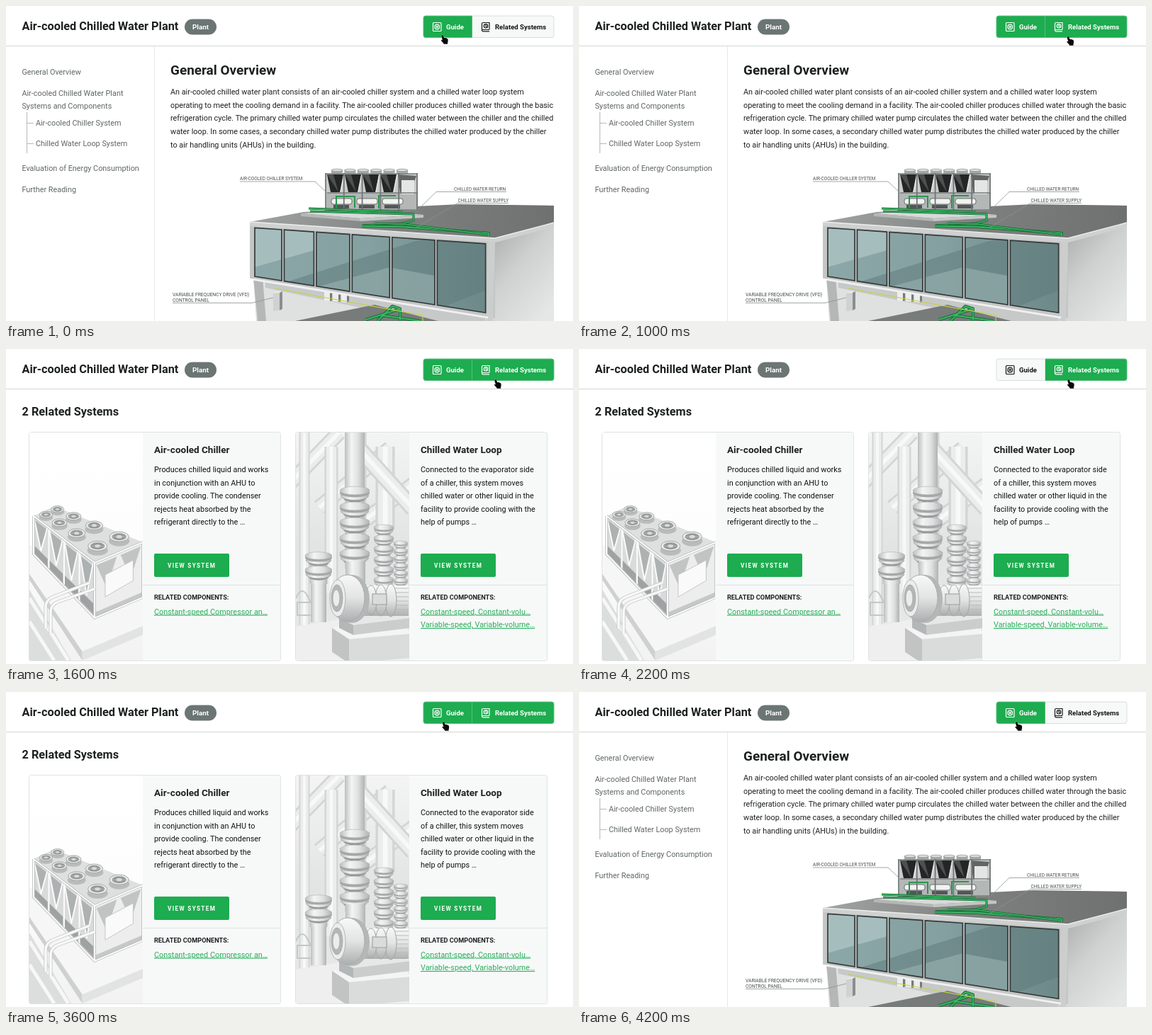
Animation of 800x445 px, one loop 4600 ms. Source, as an HTML page:

```html
<!DOCTYPE html>
<html lang="en">
<head>
<meta charset="utf-8">
<title>Chilled water plant guide</title>
<style>
html, body { margin: 0; width: 100%; height: 100%; overflow: hidden; background: #fff; }
svg { display: block; width: 800px; height: 445px; font-family: Roboto, Arial, sans-serif; }
.link { text-decoration: underline; text-decoration-thickness: .7px; }
</style>
</head>
<body>
<svg id="stage" viewBox="0 0 800 445"></svg>
<script>
const GREEN = '#1dac4f', INK = '#1d2021', NAV = '#5f6665', RULE = '#dfe3e3';

// Markup helpers; points are [x, y] pairs
const each = (n, make) => Array.from({ length: n }, (_, i) => make(i)).join('');
const text = (x, y, s, size, fill = INK, extra = '') =>
  `<text x="${x}" y="${y}" font-size="${size}" fill="${fill}" ${extra}>${s}</text>`;
const bold = (x, y, s, size, fill = INK, extra = '') => text(x, y, s, size, fill, 'font-weight="700" ' + extra);
const lines = (x, y, step, list, size, fill, extra) =>
  list.map((s, i) => text(x, y + i * step, s, size, fill, extra)).join('');
const poly = (pts, fill, extra = '') => `<polygon points="${pts}" fill="${fill}" ${extra}/>`;
const rect = (x, y, w, h, fill, extra = '') =>
  `<rect x="${x}" y="${y}" width="${w}" height="${h}" fill="${fill}" ${extra}/>`;
const oval = (x, y, rx, ry, fill, extra = '') =>
  `<ellipse cx="${x}" cy="${y}" rx="${rx}" ry="${ry}" fill="${fill}" ${extra}/>`;
const path = (d, stroke, width = 1) =>
  `<path d="${d}" fill="none" stroke="${stroke}" stroke-width="${width}" stroke-linejoin="round"/>`;
const edge = (...pts) => 'M' + pts.join('L');
const clip = (id, shape, content) => `<clipPath id="${id}">${shape}</clipPath><g clip-path="url(#${id})">${content}</g>`;
const gradient = (id, stops, dir = 'x2="1" y2="0"') =>
  `<linearGradient id="${id}" x1="0" y1="0" ${dir}>` + stops.map((c, i) =>
    `<stop offset="${i / (stops.length - 1)}" stop-color="${c}"/>`).join('') + '</linearGradient>';

const pipe = (d, w, dark, mid, light) => path(d, dark, w) + path(d, mid, w * .75) + path(d, light, w * .25);
const greenPipe = (d, w = 3) => pipe(d, w, '#0d5c2c', '#1f9a47', '#4fbd74');
const palePipe = (d, w) => pipe(d, w, '#d3d4d4', '#ebecec', '#f8f8f8');

// Box seen from its near top corner, with edges a (to the left) and b (to the right)
function box(p, a, b, h, top, left, right) {
  const add = (q, r) => [q[0] + r[0], q[1] + r[1]], down = [0, h];
  const face = (e, fill) => poly([p, add(p, e), add(add(p, e), down), add(p, down)], fill);
  return poly([p, add(p, a), add(add(p, a), b), add(p, b)], top) + face(a, left) + face(b, right);
}

function roofChiller() {
  let s = each(6, i => rect(459 + i * 18.4, 232, 16, 5, '#a9acac') +
    oval(467 + i * 18.4, 232, 8, 1.8, '#dcdddd', 'stroke="#777" stroke-width=".6"'));
  s += rect(451, 237, 130, 27, '#c9cbcb') + rect(452, 264, 129, 25, '#b3b7b6');
  s += each(4, i => {
    const x = 453 + i * 25;
    return poly([[x, 238], [x + 23, 238], [x + 18, 263], [x + 5, 263]], '#242626') +
      poly([[x, 238], [x + 9, 238], [x + 16, 263]], '#4d5050') + path(`M${x + 24} 237l-5 27`, '#ececec', 1.2);
  });
  s += poly([[553, 238], [579, 240], [570, 264], [556, 264]], '#626565') + rect(558, 246, 18, 20, '#e4e5e5');
  s += each(3, i => {
    const x = 459 + i * 36;
    return rect(x, 272, 29, 8, '#f1f2f2', 'stroke="#555" stroke-width=".8" rx="3"') + rect(x + 3, 281, 22, 5, '#525656');
  });
  return s + greenPipe('M466 287V269H492V285M526 286V268H550', 2) +
    path('M451 237H581M453 264H581M455 288H581', '#777c7c', 1.4) + each(6, i => path(`M${451 + i * 25.8} 236v53`, '#6d7272', 1.7));
}

function building() {
  // u runs along the facade, v down it
  const front = (u, v) => [349 + 331 * u, 311 + 22 * u + v * (73 + 31 * u)];
  const strip = (u0, v0, u1, v1) => [front(u0, v0), front(u1, v0), front(u1, v1), front(u0, v1)];
  const panes = [];
  for (let i = 0, x = 2; i < 6; i++) {
    const w = 38 + 3.4 * i + .53 * i * i;
    panes.push(strip(x / 331, .03, (x + w) / 331, .97));
    x += w + 3.5;
  }
  const low = 445, corner = [690, 331];
  let s = poly([front(0, 1), front(1, 1), [680, low], [353, low]], '#dfe0e0') +
    poly([front(.05, 1), front(1, 1), [676, low], [590, low], [366, 398]], '#c7c9c9');
  s += poly([[408, low], [520, 422], [610, low]], '#777b7a') + poly([front(0, 1), front(.04, 1), [367, low], [355, low]], '#b5b7b7');
  s += box([386, 405], [-9, 1], [4, -2], 25, '#eee', '#d0d2d2', '#8b8e8e') +
    each(3, i => box([457 + i * 12, 404 + i], [-8, -1], [3, -1], 13, '#fff', '#eceded', '#777a7a'));
  s += greenPipe('M508 443L556 428V445M524 445L545 424L557 428M530 437L585 445', 4) + path('M380 399L588 437V445', '#c5d338', 1.1);
  // roof, side wall and glazing
  s += poly([[344, 305], [420, 291], [640, 280], [773, 282], [773, 310], corner], 'url(#roof)') +
    poly([corner, [773, 309], [773, low], [676, low]], 'url(#side)');
  s += path(edge([344, 308], corner, [773, 309]), '#cfd1d1', 6) + path(edge([344, 305], [690, 328], [773, 306]), '#eceded', 1.4);
  s += poly(strip(-.015, 0, 1.03, 1.02), '#c4c6c6') + poly([front(1, 0), corner, [687, low], [678, low]], '#cccece');
  s += clip('glass', panes.map(p => poly(p, '#fff')).join(''), rect(348, 308, 332, 130, 'url(#pane)') +
    poly([front(0, 0), front(.26, 0), front(.26, .35), front(0, .8)], '#a6bdbd') +
    poly([front(.13, 1), front(.7, .05), front(1, 0), front(1, .65), front(.8, 1)], '#5f7b7a', 'opacity=".5"') +
    poly([front(.26, 1), front(.58, .5), front(.78, .55), front(.78, 1)], '#9ab2b2', 'opacity=".6"'));
  s += panes.map(p => poly(p, 'none', 'stroke="#343a3a" stroke-width="1.7"')).join('') + path(edge(front(0, 1.03), front(1, 1.03)), '#f0f0f0', 3);
  // plinth, chiller and roof piping
  s += box([500, 300], [-84, -7], [89, -5], 4, '#d8d9d9', '#b4b7b6', '#c4c6c6') + roofChiller();
  return s + greenPipe('M427 286L560 291') + greenPipe('M429 290L575 294V303L560 307L503 310') +
    greenPipe('M502 311L563 312L681 321V325', 4) + greenPipe('M520 307L561 308L680 323', 3);
}

function plantArt() {
  const label = (x, y, s, size = 6.4) => text(x, y, s, size, '#484c4c');
  return clip('hero', rect(232, 222, 541.5, 223, '#fff'), building() +
    path('M330 248H436L452 263M706 262.5H607L577 292M709 278.5H637L579 313M235 419.5H347L377 412', '#8d9191', .8) +
    label(330, 246, 'AIR-COOLED CHILLER SYSTEM') + label(632, 260.5, 'CHILLED WATER RETURN') + label(637.5, 276.5, 'CHILLED WATER SUPPLY') +
    label(235, 410, 'VARIABLE FREQUENCY DRIVE (VFD)', 6.7) + label(235, 417.5, 'CONTROL PANEL', 6.7));
}

function chillerArt() {
  // u along the unit, v across it, h from the deck down to the feet
  const at = (u, v, h = 0) => [39 + 86 * u + v * (29 + 39 * u), 236 + 66 * u - v * (14 + 15 * u) + h * (54 + 24 * u)];
  let s = rect(33, 118, 160, 322, 'url(#floor)');
  s += poly([at(-.3, -.6, 1.1), at(1.25, -.5, 1.1), at(1.25, 1, 1.1), at(0, 1, 1.1)], '#f6f6f6') +
    poly([at(-.3, -.6, 1.1), at(1.25, -.5, 1.1), at(1.25, -.5, 1.25), at(-.3, -.6, 1.25)], '#cfd1d1') +
    poly([at(1.25, -.5, 1.1), at(1.25, 1, 1.1), at(1.25, 1, 1.25), at(1.25, -.5, 1.25)], '#e2e3e3');
  s += poly([[33, 340], [92, 440], [33, 440]], '#dcdddd') + path('M33 352L88 440M33 385L68 440', '#f7f7f7', 5);
  s += poly([at(0, 0, 1), at(1, 0, 1), at(1, 1, 1), at(1, 1, .7), at(0, 0, .7)], '#c6c8c8');
  s += poly([at(0, 0), at(1, 0), at(1, 0, .92), at(0, 0, .92)], '#d9dada') + poly([at(1, 0), at(1, 1), at(1, 1, .9), at(1, 0, .9)], '#ededed');
  // V-shaped coil bays along the side and on the end
  s += each(4, i => {
    const a = i / 4, b = a + .23, m = a + .12;
    return poly([at(a, 0, .08), at(b, 0, .08), at(m, 0, .7)], '#aeb1b1') + poly([at(a, 0, .76), at(b, 0, .76), at(b, 0, .95), at(a, 0, .95)], '#9fa2a2') +
      path(edge(at(a, 0), at(m, 0, .72), at(b, 0)) + edge(at(a, 0), at(a, 0, 1)), '#fbfbfb', 2);
  });
  s += each(2, i => poly([at(1, i / 2 + .04, .06), at(1, i / 2 + .46, .06), at(1, i / 2 + .25, .55)], '#c2c4c4'));
  s += poly([at(1, .22, .3), at(1, .8, .25), at(1, .8, .62), at(1, .22, .7)], '#fafafa', 'stroke="#c4c6c6"');
  const frame = edge(at(0, 0), at(0, 0, 1), at(1, 0, 1), at(1, 1, 1), at(1, 1), at(1, 0), at(0, 0)) + edge(at(1, 0), at(1, 0, 1));
  s += poly([at(0, 0), at(0, 1), at(1, 1), at(1, 0)], '#dedfdf') + path(frame, '#a9acac', 3.4) + path(frame, '#fbfbfb', 2.2);
  s += each(8, n => {
    const i = n >> 1, r = 9 + 1.5 * i, [x, y0] = at(.1 + .17 * i + .027 * i * i, n % 2 ? .27 : .76), y = y0 - r * .5;
    return oval(x, y + r * .45, r * 1.08, r * .55, '#b9bbbb') + oval(x, y, r, r * .52, '#ededed', 'stroke="#a2a5a5"') +
      oval(x, y, r * .75, r * .37, '#969a9a') + oval(x, y, r * .3, r * .16, '#e0e1e1') + path(`M${x - r * .7} ${y}h${r * 1.4}`, '#c4c6c6', .6);
  });
  const riser = dx => `M${56 + dx} ${395 + dx}v-30q0 -11 11 -15l51 -${20 - dx / 4}`;
  return s + each(2, i => pipe(riser(i * 7), 5, '#c0c2c2', '#f0f0f0', '#fff'));
}

// Vertical pipe with n flanged joints
function flanges(x, w, y, n) {
  const step = w * 1.05;
  return rect(x - w * .65, y, w * 1.3, n * step, 'url(#tube)') + each(n, i => {
    const c = y + i * step;
    return oval(x, c + w * .48, w * .78, w * .3, '#939797') + oval(x, c + w * .34, w * .94, w * .3, 'url(#tube)', 'stroke="#a6a9a9" stroke-width=".6"') +
      oval(x, c + w * .15, w, w * .3, '#a4a7a7') + oval(x, c, w, w * .28, 'url(#tube)', 'stroke="#aeb1b1" stroke-width=".6"');
  });
}

function pumpArt() {
  let s = rect(409, 118, 160, 322, 'url(#room)');
  s += each(3, i => palePipe(`M${400 + i * 42} ${190 + i * 34}l${70 + i * 30} -${72 + i * 12}`, 22)) +
    each(4, i => palePipe(`M${421 + i * 38} ${118 + (i % 2) * 20}V${390 - i * 45}`, 15 + i * 4)) + palePipe('M490 132L575 226', 24);
  s += poly([[409, 392], [568, 366], [568, 440], [409, 440]], '#efefef');
  s += path('M409 352q9 -20 18 0t18 0M411 358h34v18h-34z', '#c5c7c7', 2);
  s += flanges(557, 10, 274, 6) + flanges(533, 14, 252, 6) + rect(430, 300, 22, 86, 'url(#tube)') + flanges(441, 19, 292, 2);
  s += rect(478, 118, 28, 80, 'url(#tube)') + flanges(492, 21, 200, 5) + rect(479, 300, 28, 40, 'url(#tube)');
  // base, motor, coupling and volute
  s += box([484, 410], [-24, -16], [90, -8], 34, '#f4f4f4', '#c2c4c4', '#dadbdb') + box([490, 390], [-20, -10], [80, -10], 14, '#e6e7e7', '#b4b7b7', '#cbcdcd');
  s += rect(505, 334, 63, 43, 'url(#barrel)') + each(7, i => path(`M548 ${338 + i * 6}h20`, '#b9bbbb'));
  s += each(3, i => oval(543 - i * 14, 355, 8, 23 - i, 'url(#barrel)', 'stroke="#a2a5a5"')) + rect(517, 346, 20, 15, '#dadbdb', 'stroke="#999c9c"');
  s += oval(488, 353, 25, 34, '#b4b7b7') + oval(482, 352, 24, 33, 'url(#barrel)', 'stroke="#a9acac"');
  return s + each(3, i => oval(468 - i, 352, 11 - i * 3, 26 - i * 7, i % 2 ? '#b4b7b7' : '#ebecec', 'stroke="#9c9f9f" stroke-width=".7"'));
}

function card(x, art, title, body, links) {
  const tx = x + 176.5, size = 10.87, step = 18.55;
  return rect(x, 117.5, 355, 323, '#f7f9f9', `stroke="${RULE}" rx="3"`) + clip('card' + x, rect(x + .5, 118, 160, 322, '#fff'), art) +
    path(`M${x + 160.5} 333.5h194.5`, RULE) + bold(tx, 147, title, 13.5) + lines(tx, 174, step, body, size, '#101213') +
    rect(tx, 289, 106, 33, GREEN, 'rx="2"') + bold(tx + 19, 309, 'VIEW SYSTEM', 8.16, '#fff', 'letter-spacing="1.36"') +
    bold(tx, 353.5, 'RELATED COMPONENTS:', 9.2) + lines(tx, 374.5, step, links, size, '#29ae59', 'class="link"');
}

const defs = gradient('roof', ['#a1a4a3', '#7d807f', '#6e7170']) + gradient('side', ['#a5a7a7', '#cfd0d0', '#e5e6e6'], 'x2=".8" y2="1"') +
  gradient('pane', ['#8ca7a7', '#85a0a0', '#6d8888']) + gradient('floor', ['#fff', '#fdfdfd', '#f2f2f2'], 'x2="0" y2="1"') +
  gradient('room', ['#f4f4f4', '#e2e3e3', '#e8e9e9'], 'x2="0" y2="1"') +
  gradient('tube', ['#bcbfbf', '#f4f4f4', '#dfe0e0', '#b0b3b3']) + gradient('barrel', ['#f8f8f8', '#e2e3e3', '#acafaf'], 'x2="0" y2="1"');

const header = bold(22.5, 34, 'Air-cooled Chilled Water Plant', 16.3) +
  rect(252, 18.5, 45, 22, '#6b7574', 'rx="11"') + bold(263, 33.2, 'Plant', 9.85, '#fff') + path('M0 56.5H800', '#d3d7d7');

const nav = (x, y, step, ...list) => lines(x + .4, y, step, list, 10.85, NAV);
const guideView = path('M209.5 57V445', '#e6e9e9') + path('M29.5 150v58M29.5 165.5h9.5M29.5 194.5h9.5', '#b5b9b9') +
  nav(22, 97, 30, 'General Overview', 'Air-cooled Chilled Water Plant') + nav(22, 145, 0, 'Systems and Components') +
  nav(41.5, 169, 29, 'Air-cooled Chiller System', 'Chilled Water Loop System') +
  nav(22, 232.5, 30, 'Evaluation of Energy Consumption', 'Further Reading') +
  bold(232, 97, 'General Overview', 18.95) +
  lines(232, 125.3, 18.55, [
    'An air-cooled chilled water plant consists of an air-cooled chiller system and a chilled water loop system',
    'operating to meet the cooling demand in a facility. The air-cooled chiller produces chilled water through the basic',
    'refrigeration cycle. The primary chilled water pump circulates the chilled water between the chiller and the chilled',
    'water loop. In some cases, a secondary chilled water pump distributes the chilled water produced by the chiller',
    'to air handling units (AHUs) in the building.'], 10.84) + plantArt();

const systemsView = bold(22.5, 94, '2 Related Systems', 16.3) +
  card(32.5, chillerArt(), 'Air-cooled Chiller',
    ['Produces chilled liquid and works', 'in conjunction with an AHU to', 'provide cooling. The condenser',
     'rejects heat absorbed by the', 'refrigerant directly to the …'], ['Constant-speed Compressor an…']) +
  card(408.5, pumpArt(), 'Chilled Water Loop',
    ['Connected to the evaporator side', 'of a chiller, this system moves', 'chilled water or other liquid in the',
     'facility to provide cooling with the', 'help of pumps …'], ['Constant-speed, Constant-volu…', 'Variable-speed, Variable-volume…']);

const guideIcon = '<rect x="602.5" y="23.5" width="11.5" height="12" rx="1"/><circle cx="608.2" cy="29.5" r="3.3"/><circle cx="608.2" cy="29.5" r="1.2"/>';
const relatedIcon = '<path d="M682 33.2V23.5H673Q671.5 23.5 671.5 25V34Q671.5 35.8 673 35.8H682M671.5 33.5H682"/>' +
  '<circle cx="677" cy="28.3" r="2.7"/><path d="M677 26.5v2l1.5 1"/>';
// Outer edge is rounded; d points from the outer edge to the shared divider
const tab = (id, outer, d, icon, x, label) =>
  `<g id="${id}"><path d="M657.5 14H${outer + 3 * d}Q${outer} 14 ${outer} 17V41.5Q${outer} 44.5 ${outer + 3 * d} 44.5H657.5Z"/>` +
  `<g fill="none" stroke="currentColor" stroke-width="1.2">${icon}</g>${bold(x, 32.8, label, 9.55, 'currentColor')}</g>`;

const $ = id => document.getElementById(id);
$('stage').innerHTML = `<defs>${defs}</defs><g id="guideView">${guideView}</g><g id="systemsView">${systemsView}</g>` + header +
  tab('related', 773, -1, relatedIcon, 690, 'Related Systems') + tab('guide', 589, 1, guideIcon, 621, 'Guide') +
  '<path id="hand" d="M1.2 1Q2.8 0 3.6 1.6L4.6 4.5Q5.8 3.7 6.5 4.8Q7.8 4.2 8.3 5.4Q9.8 5.2 10 6.8Q10.5 9.5 9.6 11.2V13.2H4.3' +
  'Q3.8 11.5 1.3 9.4Q-.2 7.8 .8 7.3Q1.6 7 2.5 8L.8 2.5Q.6 1.5 1.2 1Z" fill="#0a0a0a" stroke="#fff" stroke-width=".8" paint-order="stroke"/>';

const LOOP = 4600, STEP = 100, FADE = 300;
const progress = (t, from, length) => Math.min(1, Math.max(0, (t - from) / length));
const fade = (t, from) => 1 - (1 - progress(t, from, FADE)) ** 2;
const glide = (t, from, length) => {
  const p = progress(t, from, length);
  return p * p * (3 - 2 * p);
};
const mix = (a, b, k) => `rgb(${a.map((v, i) => Math.round(v + (b[i] - v) * k))})`;

function paintTab(el, k) {
  el.firstChild.setAttribute('fill', mix([247, 249, 249], [29, 172, 79], k));
  el.firstChild.setAttribute('stroke', mix([217, 221, 221], [85, 190, 122], k));
  el.style.color = mix([20, 20, 20], [255, 255, 255], k);
}

function draw(now) {
  const t = Math.floor(now % LOOP / STEP) * STEP;
  const systems = t >= 1600 && t < 3700;
  $('systemsView').style.display = systems ? '' : 'none';
  $('guideView').style.display = systems ? 'none' : '';
  paintTab($('guide'), 1 - fade(t, 1600) + fade(t, 2690));
  paintTab($('related'), fade(t, 678) - fade(t, 3700));
  const out = glide(t, 100, 950), back = glide(t, 2400, 630);
  $('hand').setAttribute('transform', `translate(${613.5 + 75 * out - 73.5 * back} ${40.5 + 2 * out - back})`);
}

const start = performance.now();
function tick() {
  draw(performance.now() - start);
  requestAnimationFrame(tick);
}
tick();
</script>
</body>
</html>
```
